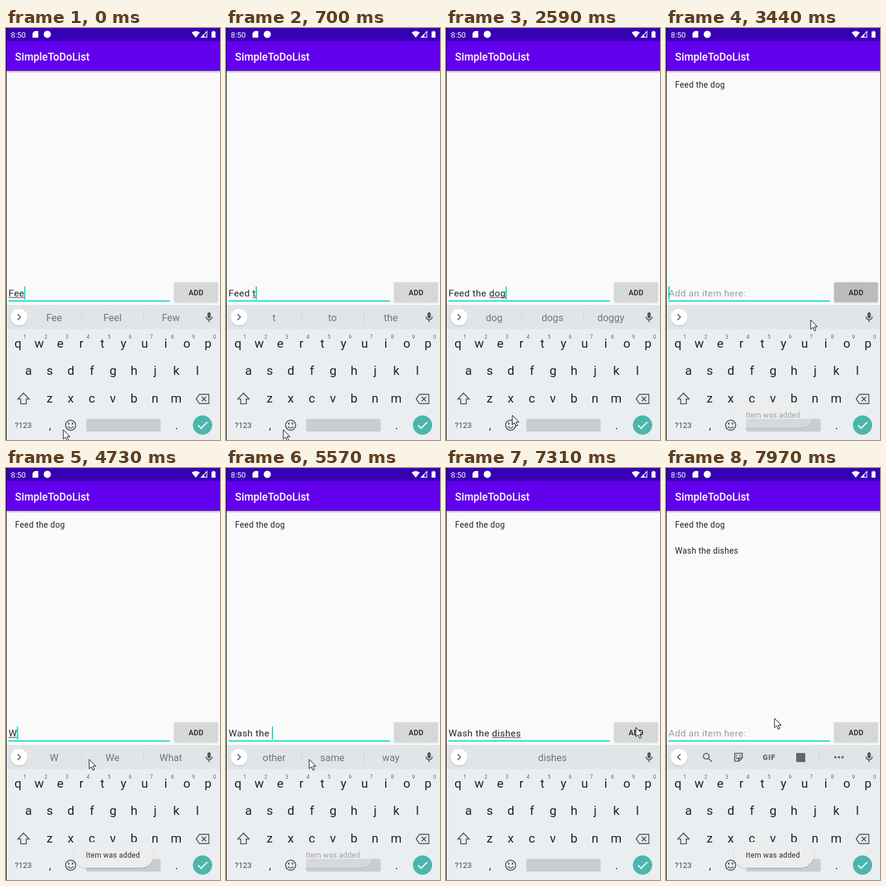
Write an HTML page that moves like this. It is 355 px wide and 683 px high and loops after 8 s.

```html
<!DOCTYPE html>
<html lang="en">
<head>
<meta charset="utf-8">
<title>SimpleToDoList</title>
<style>
  html, body { margin: 0; width: 100%; height: 100%; overflow: hidden; background: #fafafa; }
  svg { display: block; width: 100vw; height: 100vh; font-family: Roboto, sans-serif; }
  text { white-space: pre; }
  .mid { text-anchor: middle; }
  .line { fill: none; stroke: #4b5a62; stroke-width: 1.7; }
  .key { font-size: 20.7px; fill: #14272f; text-anchor: middle; }
  .digit { font-size: 9px; fill: #5f6d74; text-anchor: middle; }
  .word { font-size: 16.4px; fill: #6d777c; text-anchor: middle; }
  .item { font-size: 13.8px; letter-spacing: .27px; fill: #262626; }
  .field { font-size: 15.55px; letter-spacing: .43px; }
</style>
</head>
<body>
<svg viewBox="0 0 355 683" preserveAspectRatio="none">
  <defs>
    <linearGradient id="shade" x2="0" y2="1">
      <stop stop-color="#000" stop-opacity=".28"/>
      <stop offset="1" stop-color="#000" stop-opacity="0"/>
    </linearGradient>
    <filter id="soft" x="-20%" y="-20%" width="140%" height="150%">
      <feDropShadow dx="0" dy="1" stdDeviation="1" flood-opacity=".22"/>
    </filter>
  </defs>

  <rect width="355" height="683" fill="#fafafa"/>
  <rect y="71" width="355" height="4" fill="url(#shade)"/>
  <rect y="21" width="355" height="50" fill="#6200ee"/>
  <rect width="355" height="21.5" fill="#3700b3"/>
  <text x="15" y="54" font-size="17.6" font-weight="500" fill="#fff">SimpleToDoList</text>

  <g fill="#fff">
    <text x="8" y="15.5" font-size="12.9">8:50</text>
    <path d="M47.5 5H53.5V16H44V8.5Z"/>
    <circle cx="68.5" cy="10.5" r="6"/>
    <path d="M308 7.5Q314.7 2.5 321.5 7.5L314.7 16Z"/>
    <path d="M323.8 15.3L333.3 5.8V15.3Z" fill="none" stroke="#fff" stroke-width="1.2"/>
    <path d="M323 16L329 10V16Z"/>
    <path d="M341 6H343V4.7H345.5V6H347.5V16H341Z"/>
  </g>

  <text class="item" x="15" y="98.5">Feed the dog</text>
  <text class="item" x="15" y="142">Wash the dishes</text>

  <rect x="4" y="451.5" width="268" height="2" fill="#03dac5"/>
  <text id="hint" class="field" x="4.3" y="445" fill="#9b9b9b">Add an item here:</text>
  <text id="typed" class="field" x="4.3" y="445" fill="#262626"></text>
  <rect id="under" y="446.3" height="1" fill="#333"/>
  <rect id="caret" y="428.5" width="2" height="21.5" fill="#03dac5"/>

  <g filter="url(#soft)"><rect id="add" x="279" y="421.5" width="72.5" height="33" rx="1.5"/></g>
  <text class="mid" x="315.3" y="443" font-size="12.1" font-weight="500" letter-spacing=".3" fill="#1f1f1f">ADD</text>

  <rect y="459" width="355" height="224" fill="#ebeef0"/>
  <rect y="459" width="355" height="40.5" fill="#e1e5e8"/>
  <circle cx="21.7" cy="479.3" r="13.8" fill="#fff" filter="url(#soft)"/>
  <path id="chevron" class="line"/>
  <g id="words">
    <path id="bars" d="M125.5 468V490M228.5 468V490" stroke="#cdd3d6"/>
    <text class="word" x="79.8" y="486"></text>
    <text class="word" x="176.6" y="486"></text>
    <text class="word" x="273.4" y="486"></text>
  </g>
  <g id="tools" fill="#5a686f">
    <circle class="line" cx="66.8" cy="477.8" r="4.7"/>
    <path class="line" d="M70.2 481.2L76 487" stroke-width="2"/>
    <path class="line" d="M114 473H126.5V480.5L121 486H114Z" stroke-linejoin="round"/>
    <path class="line" d="M126.5 480.5H121V486M116.5 480Q118 483 121 481M117 475.5V478M123 475.5V478" stroke-width="1.2"/>
    <text class="mid" x="171.2" y="483.8" font-size="12.3" font-weight="900" letter-spacing=".8">GIF</text>
    <rect x="216" y="472.5" width="15" height="15"/>
    <path d="M254.5 470V490" stroke="#cdd3d6"/>
    <circle cx="281" cy="479.5" r="2"/><circle cx="287" cy="479.5" r="2"/><circle cx="293" cy="479.5" r="2"/>
  </g>
  <g>
    <rect x="334.2" y="471.2" width="5.4" height="10" rx="2.7" fill="#4b5a62"/>
    <path class="line" d="M331.7 478.5A5.2 5.2 0 0 0 342.1 478.5M336.9 484V487.5" stroke-width="1.5"/>
  </g>

  <g id="keys"></g>
  <path class="line" d="M29 605.3L19.7 615H24.4V623H33.6V615H38.3Z"/>
  <path class="line" d="M315.5 615L321 607.3H336.5V622.7H321ZM324.5 611.3L332 618.8M332 611.3L324.5 618.8"/>
  <text class="mid" x="28.6" y="663" font-size="13" fill="#3c4a51">?123</text>
  <text class="key" x="73" y="665" style="font-size:18px">,</text>
  <text class="key" x="283" y="665" style="font-size:18px">.</text>
  <circle class="line" cx="107.2" cy="658.5" r="8.4"/>
  <path class="line" d="M102.7 660.5Q107.2 666 111.7 660.5"/>
  <path d="M104.2 654V657.4M110.2 654V657.4" stroke="#4b5a62" stroke-width="2.2"/>
  <rect x="133" y="648" width="123.5" height="21" rx="2.5" fill="#c8cdd0"/>
  <circle cx="326" cy="658.3" r="16" fill="#4db6ac"/>
  <path d="M318.5 658.5L323.7 663.7L334 653.3" fill="none" stroke="#fff" stroke-width="2"/>

  <g id="toast">
    <rect x="112" y="620" width="133" height="42.5" rx="21" fill="#ededee" filter="url(#soft)"/>
    <text class="mid" x="177.5" y="646" font-size="12.1" letter-spacing=".3" fill="#2b2b2b">Item was added</text>
  </g>

  <path d="M0 0H355V1.5Q354 0 351 0H5Q1 0 1 5V683H0Z" fill="#0b0b12"/>
  <path id="mouse" d="M0 0V15.5L3.6 12.2L6.2 18L8.8 16.9L6.2 11.3H11Z" fill="#fff" stroke="#000" stroke-linejoin="round"/>
</svg>
<script>
const LOOP = 8000;
const $ = q => document.querySelector(q);
const $$ = q => [...document.querySelectorAll(q)];

function addKey(cls, x, y, label) {
  const el = document.createElementNS('http://www.w3.org/2000/svg', 'text');
  el.setAttribute('class', cls);
  el.setAttribute('x', x);
  el.setAttribute('y', y);
  el.textContent = label;
  $('#keys').append(el);
}
[['qwertyuiop', 20, 529.5], ['asdfghjkl', 37.5, 574.5], ['zxcvbnm', 72.3, 620.5]].forEach(([row, x, y], r) =>
  [...row].forEach((ch, i) => {
    addKey('key', x + i * 35, y, ch);
    if (!r) addKey('digit', x + 11 + i * 35, 515, (i + 1) % 10);
  }));

// Each step changes only the listed parts of the state.
const type = (text, strip) => ({ text, strip, caret: 1 });
const move = (x, y) => ({ mouse: [x, y] });
const sent = items => ({ items, text: '', strip: '', caret: 1 });
const steps = [
  [0, { ...type('Fee', 'Fee|Feel|Few'), ...move(95, 666), items: 0, toast: 0, down: 0 }],
  [150, type('Feed ', 'the|him|us')],
  [580, type('Feed t', 't|to|the')],
  [720, type('Feed the', 'the|they|together')],
  [850, type('Feed the ', 'next|same|way')],
  [1130, type('Feed the d', 'd|do|day')],
  [1250, type('Feed the di', 'di|did|die')],
  [1370, type('Feed the dio', 'dio|diocese|did')],
  [1770, type('Feed the di', 'di|did|die')],
  [1900, type('Feed the d', 'd|do|day')],
  [2030, type('Feed the do', "do|dog|don't")],
  [2160, type('Feed the dog', 'dog|dogs|doggy')],
  [2590, move(110, 642)],
  [2720, { ...move(140, 606), caret: 0 }],
  [2860, move(166, 578)],
  [3140, { ...move(292, 446), caret: 1 }],
  [3290, { ...move(302, 440), down: 1 }],
  [3440, { ...sent(1), ...move(240, 484), toast: .4 }],
  [3560, { ...move(182, 484), down: 0, toast: .8, strip: 'tools' }],
  [3700, { ...move(146, 483), toast: .95 }],
  [3830, { ...move(138, 483), toast: 1, caret: 0 }],
  [4330, { caret: 1 }],
  [4600, type('W', '')],
  [4730, type('W', 'W|We|What')],
  [4880, type('Wa', 'Wa|Was|Want')],
  [5010, type('Was', 'Was|Wash|Washing')],
  [5140, type('Wash', 'Wash|Washed|Washing')],
  [5270, type('Wash ', 'the|and|it')],
  [5420, { ...type('Wash the', 'the|them|they'), toast: .8 }],
  [5570, { ...type('Wash the ', 'other|same|way'), toast: .4 }],
  [5700, { ...type('Wash the d', 'd|do|day'), toast: 0 }],
  [5830, type('Wash the di', 'di|did|dinner')],
  [5960, type('Wash the dis', 'dis|dish|distance')],
  [6090, type('Wash the dish', 'dish|dishes|dishwasher')],
  [6490, type('Wash the dishe', 'dishe|dishes|dished')],
  [6610, type('Wash the dishes', '|dishes|')],
  [6920, move(172, 474)],
  [7050, move(240, 452)],
  [7180, { ...move(300, 434), caret: 0 }],
  [7310, move(315, 430)],
  [7430, { down: 1 }],
  [7550, { ...sent(2), ...move(300, 428), toast: .3 }],
  [7680, { ...move(246, 424), down: 0, toast: .75, strip: 'tools' }],
  [7820, { ...move(202, 420), toast: .95 }],
  [7970, { ...move(180, 415), toast: 1, caret: 0 }]
];

const pen = document.createElement('canvas').getContext('2d');
function widthOf(s) {
  pen.font = '15.55px Roboto, sans-serif';
  return pen.measureText(s).width + s.length * .43;
}
const show = (el, on) => el.setAttribute('visibility', on ? 'visible' : 'hidden');

const items = $$('.item'), words = $$('.word');

function draw(t) {
  const s = {};
  for (const [at, change] of steps) if (at <= t) Object.assign(s, change);

  items.forEach((el, i) => show(el, i < s.items));
  show($('#hint'), !s.text);
  $('#typed').textContent = s.text;

  const head = s.text.slice(0, s.text.lastIndexOf(' ') + 1);
  const start = widthOf(head), end = widthOf(s.text);
  $('#under').setAttribute('x', 4.3 + start);
  $('#under').setAttribute('width', end - start);
  $('#caret').setAttribute('x', 4 + end);
  show($('#caret'), s.caret);

  const tools = s.strip === 'tools';
  show($('#tools'), tools);
  const parts = tools ? [] : s.strip.split('|');
  words.forEach((el, i) => { el.textContent = parts[i] || ''; });
  show($('#bars'), parts[0]);
  $('#chevron').setAttribute('d', tools ? 'M24 474.5L19.2 479.3L24 484.1' : 'M19.2 474.5L24 479.3L19.2 484.1');

  $('#add').setAttribute('fill', s.down ? '#babbbb' : '#d6d7d7');
  $('#toast').setAttribute('opacity', s.toast);
  $('#mouse').setAttribute('transform', `translate(${s.mouse})`);
}

const begin = performance.now();
function tick() {
  draw((performance.now() - begin) % LOOP);
  requestAnimationFrame(tick);
}
tick();
</script>
</body>
</html>
```
